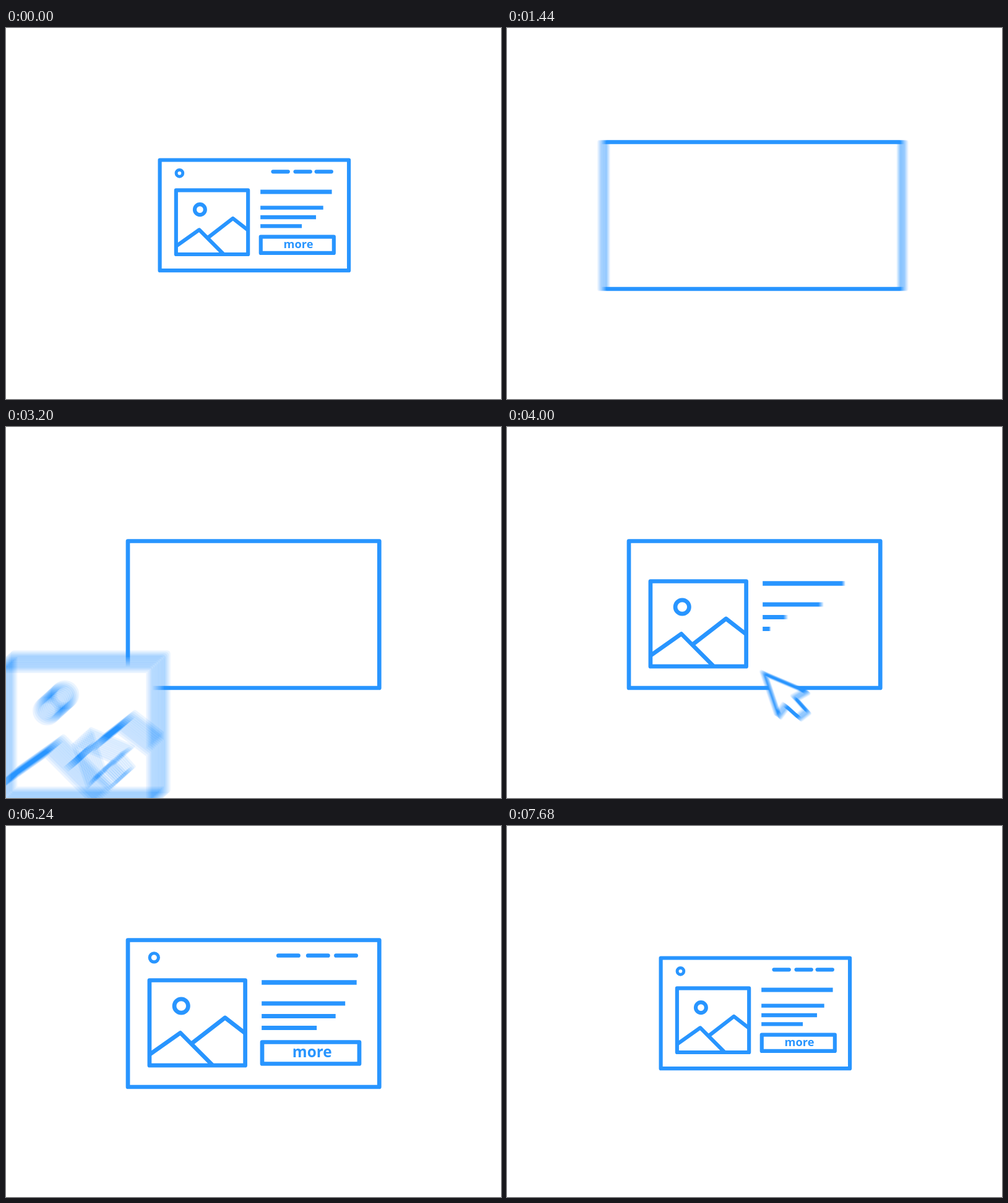
Write an HTML page with a canvas that moves like this. It is 800 px wide and 600 px high and loops after 8080 ms.

```html
<!DOCTYPE html>
<html lang="en">
<head>
<meta charset="utf-8">
<title>Wireframe card</title>
<style>
  html, body { margin: 0; width: 100%; height: 100%; overflow: hidden; background: #fff; }
  canvas { display: block; width: 800px; height: 600px; }
</style>
</head>
<body>
<canvas id="stage" width="800" height="600"></canvas>
<script>
const LOOP = 8080, STEP = 40, INTRO = 520;
const SHUTTER = 20, SAMPLES = 12;
const BLUE = '#2895ff';

const stage = document.getElementById('stage').getContext('2d');
const buffer = document.createElement('canvas');
buffer.width = 800;
buffer.height = 600;
const c = buffer.getContext('2d');

// Easing
const linear = p => p;
const speedUp = p => p * p;
const carryOn = p => 0.7 * p + 0.3 * p * p;
const outQuad = p => 1 - (1 - p) ** 2;
const outCubic = p => 1 - (1 - p) ** 3;
const inOut = p => p < 0.5 ? 4 * p ** 3 : 1 - 4 * (1 - p) ** 3;
const outBack = p => 1 + 2 * (p - 1) ** 3 + (p - 1) ** 2;

function bezier(x1, y1, x2, y2) {
  const at = (a, b, s) => 3 * (1 - s) ** 2 * s * a + 3 * (1 - s) * s * s * b + s ** 3;
  return p => {
    let lo = 0, hi = 1;
    for (let i = 0; i < 20; i++) {
      const mid = (lo + hi) / 2;
      if (at(x1, x2, mid) < p) lo = mid; else hi = mid;
    }
    return at(y1, y2, lo);
  };
}
const settle = bezier(0.4, 0, 0.1, 1);

// Value at time t along stops of [time, value, ease into it].
function key(t, ...stops) {
  if (t <= stops[0][0]) return stops[0][1];
  for (let i = 1; i < stops.length; i++) {
    const [t0, v0] = stops[i - 1], [t1, v1, ease = inOut] = stops[i];
    if (t < t1) return v0 + (v1 - v0) * ease((t - t0) / (t1 - t0));
  }
  return stops[stops.length - 1][1];
}

// Drawing helpers
function line(width, ...points) {
  c.lineWidth = width;
  c.beginPath();
  points.forEach(([x, y]) => c.lineTo(x, y));
  c.stroke();
}

function box(width, x1, y1, x2, y2) {
  c.lineWidth = width;
  c.strokeRect(x1, y1, x2 - x1, y2 - y1);
}

function ring(width, x, y, r) {
  c.lineWidth = width;
  c.beginPath();
  c.arc(x, y, r, 0, Math.PI * 2);
  c.stroke();
}

function label(text, size, x, y) {
  c.font = `700 ${size}px "Open Sans", "Noto Sans", sans-serif`;
  c.fillText(text, x, y);
}

function placed(x, y, scale, angle, draw) {
  c.save();
  c.translate(x, y);
  c.rotate(angle);
  c.scale(scale, scale);
  draw();
  c.restore();
}

// Parts
function frame(t, w) {
  const left = key(t, [1240, 82.5], [1600, 197]);
  const right = key(t, [1240, 704], [1600, 603.3]);
  const top = key(t, [500, 640], [840, 171, outQuad], [1020, 184.5]);
  const bottom = key(t, [603, 898], [1303, 422]);
  box(w, left, top, right, bottom);
}

function arrow(x, y, half, angle, grow, head, w) {
  if (grow <= 0) return;
  placed(x, y, 1, angle, () => {
    const end = half * grow;
    line(w, [-end, 0], [end, 0]);
    if (head <= 0) return;
    for (const s of [-1, 1]) {
      const back = s * (end - 6 * head);
      line(w - 0.5, [back, -7 * head], [s * end, 0], [back, 7 * head]);
    }
  });
}

function rulers(t, w) {
  if (t < 1540 || t > 3080) return;
  const ext = key(t, [1560, 0], [1800, 1], [2880, 1], [3060, 0]);
  const grow = key(t, [1620, 0], [1900, 1], [2820, 1], [3000, 0]);
  const head = key(t, [1840, 0], [1940, 1, linear], [2800, 1], [2880, 0]);
  if (ext > 0) {
    for (const x of [197, 603.3]) line(w, [x, 184.5], [x, 184.5 - 63 * ext]);
    line(w, [603, 184.5], [603 + 56 * ext, 184.5]);
    line(w, [603, 422.4], [603 + 60 * ext, 422.4]);
  }
  arrow(400.2, 134.5, 200, 0, grow, head, w);
  arrow(659.8, 303.2, 116, Math.PI / 2, grow, head, w);

  const slide = key(t, [1720, 39], [2240, 0, outCubic]);
  c.globalAlpha = key(t, [1720, 0], [1860, 1, linear], [2800, 1], [2920, 0, linear]);
  label('1900 px', 38, 393, 95 + slide);
  placed(694 - slide, 300.5, 1, Math.PI / 2, () => label('980 px', 38, 0, 0));
  c.globalAlpha = 1;
}

function picture(t, w) {
  if (t < 2800) return;
  const x = key(t, [2800, -130], [3560, 309]);
  const y = key(t, [2800, 720], [3560, 318]);
  const scale = key(t, [3560, 1.6], [3840, 1]);
  placed(x, y, scale, 0, () => {
    c.translate(-309, -318);
    c.fillStyle = '#fff';
    c.fillRect(232, 249.5, 154.6, 137.5);
    c.fillStyle = BLUE;
    ring(w, 283.2, 291, 11.2);
    c.save();
    c.beginPath();
    c.rect(232, 249.5, 154.6, 137.5);
    c.clip();
    line(w, [228, 372.5], [281.8, 334.5], [338, 391]);
    line(w, [301, 351], [354, 310], [392, 339.5]);
    c.restore();
    box(w, 231.9, 249.5, 386.6, 387.2);
  });
}

function copy(t, w) {
  const rows = [[253, 153.5, 3573], [287, 135, 3630], [307.5, 119.5, 3727], [326.5, 89, 3795]];
  c.lineCap = 'butt';
  rows.forEach(([y, length, start], i) => {
    const now = key(t, [start, 0], [start + 640, length]);
    if (now > 0) line(i ? w + 0.3 : w + 1, [413.2, y], [413.2 + now, y]);
  });
  c.lineCap = 'round';
}

const pullX = t => key(t, [4480, 655], [4980, 497.5, outCubic]);
const pullY = t => key(t, [4480, 666], [4980, 372.6, outCubic]);

function button(t, w) {
  if (t < 4480) return;
  const scale = key(t, [4480, 1.45], [5000, 1, outQuad]);
  placed(pullX(t) - 5, pullY(t) - 5.6, scale, 0, () => {
    c.fillStyle = '#fff';
    c.fillRect(-78.5, -17.5, 157, 35);
    c.fillStyle = BLUE;
    box(w, -78.5, -17.5, 78.5, 17.5);
    label('more', 24.3, 2.2, 7);
  });
}

function nav(t, w) {
  if (t < 5300) return;
  const drop = i => key(t, [5310 + i * 50, -230], [5790 + i * 50, 0, outBack]);
  ring(w - 1.6, 239.3, 212.8 + drop(0), 7.1);
  [440.3, 488.2, 533.5].forEach((x, i) => {
    const y = 209.5 + drop(i + 1);
    line(w, [x, y], [x + 32.2, y]);
  });
}

function pointer(t) {
  if (t < 2800 || t > 5500) return;
  const late = t >= 4480;
  const x = late ? pullX(t)
    : key(t, [2800, -129], [3560, 310], [3620, 310], [4000, 416, speedUp], [4400, 650, carryOn]);
  const y = late ? pullY(t)
    : key(t, [2800, 732], [3560, 330], [3620, 330], [4000, 399, speedUp], [4400, 618, carryOn]);
  const scale = key(t, [4480, 1.17], [4800, 1, outQuad]);
  const angle = key(t, [4480, -13], [4800, 0, outQuad]) * Math.PI / 180;
  c.globalAlpha = key(t, [5320, 1], [5480, 0, linear]);
  placed(x, y, scale, angle, () => {
    c.lineWidth = 5;
    c.fillStyle = '#fff';
    c.beginPath();
    [[0, 0], [51, 37], [34, 42], [46, 64], [33, 70], [19, 50], [6, 61]]
      .forEach(([px, py]) => c.lineTo(px, py));
    c.closePath();
    c.fill();
    c.stroke();
  });
  c.globalAlpha = 1;
}

function scene(t) {
  c.fillStyle = '#fff';
  c.fillRect(0, 0, 800, 600);
  c.fillStyle = c.strokeStyle = BLUE;
  c.lineCap = c.lineJoin = 'round';
  c.textAlign = 'center';

  // Lines keep their weight while the card shrinks.
  const shrink = key(t, [6220, 0], [7680, 1, settle]);
  const zoom = 1 - 0.248 * shrink;
  const w = 6.7 + 1.5 * shrink;
  placed(400.2 + 1.2 * shrink, 303.2 - 0.4 * shrink, zoom, 0, () => {
    c.translate(-400.2, -303.2);
    frame(t, w);
    rulers(t, w);
    copy(t, w);
    picture(t, w);
    button(t, w);
    nav(t, w);
    pointer(t);
  });
}

// Average several moments per picture for motion blur.
function render(t) {
  const start = t < INTRO ? t + LOOP : t;
  for (let i = 0; i < SAMPLES; i++) {
    scene(start + ((i + 0.5) / SAMPLES - 0.5) * SHUTTER);
    stage.globalAlpha = 1 / (i + 1);
    stage.drawImage(buffer, 0, 0);
  }
}

let shown = -1;
function tick() {
  const t = Math.floor(performance.now() % LOOP / STEP) * STEP;
  if (t !== shown) render(shown = t);
  requestAnimationFrame(tick);
}
tick();
</script>
</body>
</html>
```
